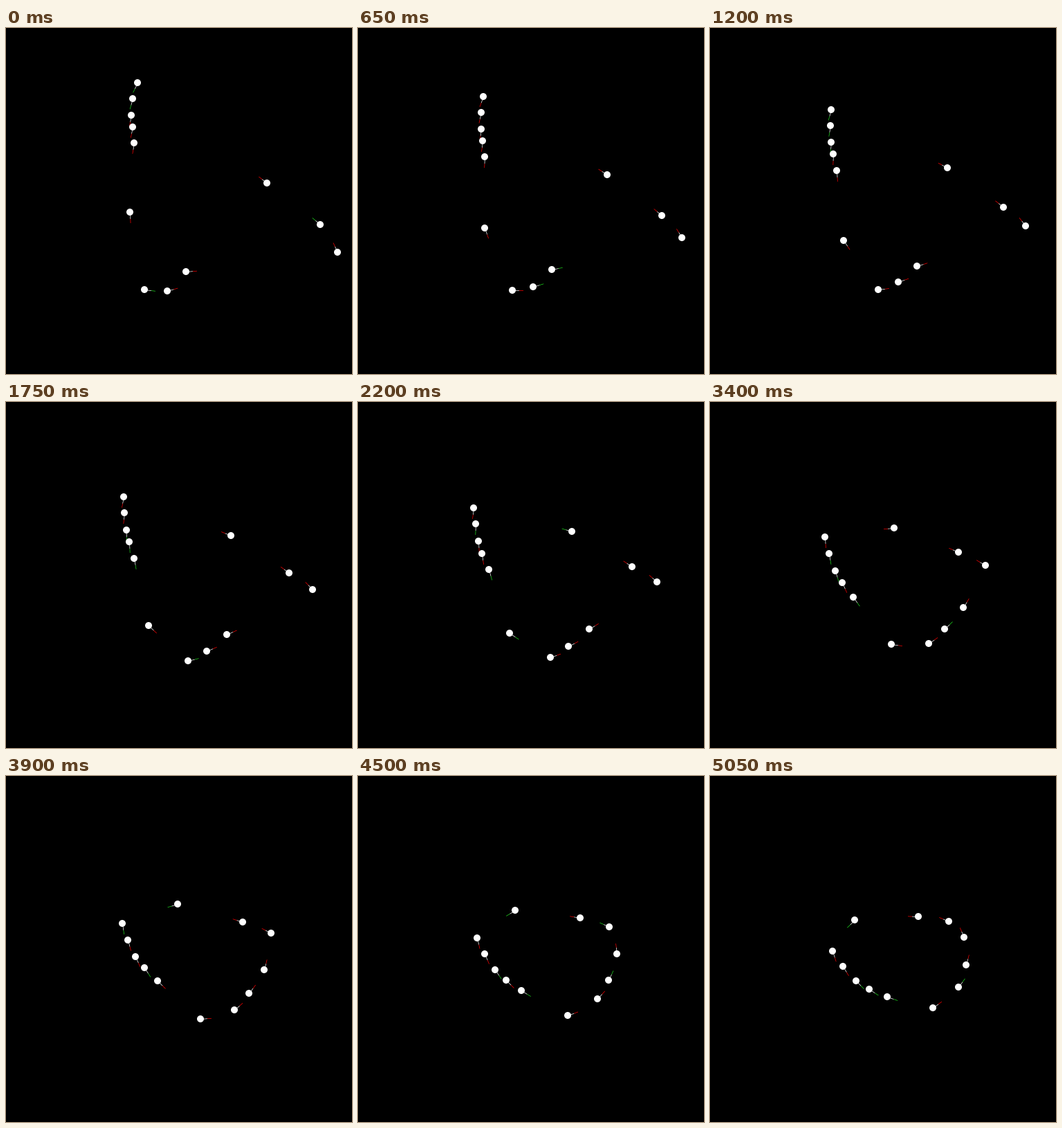
These frames come from a looping animation (500 by 500 pixels, 5100 ms). A matplotlib script:

```python
import random

import numpy as np
import matplotlib.pyplot as plt
from matplotlib.animation import FuncAnimation
from matplotlib.collections import LineCollection
from matplotlib.patches import Circle

SIZE, RADIUS, REACH, SPLIT = 500, 5, 15.5, 9.5
TICKS, TICK_MS = 102, 50
RED, GREEN = "#ff0000", "#1edc1e"

# Each agent glides on a cubic through four key points, a third of the way apart
KEY_STEPS = [0, 34, 67, 100]
PATHS = [
    [(190, 79), (170, 137), (166, 195), (177, 253)],
    [(183, 102), (171, 160), (172, 219), (192, 275)],
    [(181, 126), (174, 185), (181, 244), (211, 296)],
    [(183, 143), (178, 202), (191, 261), (230, 308)],
    [(185, 166), (185, 226), (207, 282), (256, 319)],
    [(179, 266), (206, 323), (262, 350), (322, 335)],
    [(200, 378), (263, 374), (316, 349), (359, 305)],
    [(233, 380), (290, 360), (339, 328), (370, 273)],
    [(260, 352), (319, 336), (366, 297), (367, 233)],
    [(479, 324), (443, 271), (398, 236), (345, 210)],
    [(454, 284), (409, 247), (359, 217), (301, 203)],
    [(377, 224), (325, 193), (266, 182), (209, 208)],
]
COUNT = len(PATHS)


def powers(step):
    return np.vander(np.atleast_1d(step) / 100, 4)


COEFS = np.linalg.solve(powers(np.array(KEY_STEPS)),
                        np.swapaxes(PATHS, 0, 1).reshape(4, -1))


def place(step):
    return (powers(step) @ COEFS).reshape(COUNT, 2)


fig = plt.figure(figsize=(SIZE / 100, SIZE / 100), dpi=100, facecolor="black")
ax = fig.add_axes([0, 0, 1, 1])
ax.set(xlim=(0, SIZE), ylim=(SIZE, 0))
ax.axis("off")

style = dict(linewidths=0.5, capstyle="butt")
stems = LineCollection([], colors="white", zorder=1, **style)
tips = LineCollection([], zorder=2, **style)
ax.add_collection(stems, autolim=False)
ax.add_collection(tips, autolim=False)
discs = [ax.add_patch(Circle((0, 0), RADIUS, fc="white", lw=0, zorder=3))
         for _ in range(COUNT)]


def draw(tick):
    step = max(0, tick - 1)
    pos = np.round(place(step))
    heading = place(step + 0.5) - place(step - 0.5)
    heading /= np.linalg.norm(heading, axis=1, keepdims=True)
    start = pos + 0.5
    split = start + SPLIT * heading
    stems.set_segments(np.stack([start, split], axis=1))
    tips.set_segments(np.stack([split, start + REACH * heading], axis=1))
    # Turn signals flicker independently at every step
    tips.set_color(random.Random(step).choices([RED, GREEN], (2, 1), k=COUNT))
    for disc, p in zip(discs, pos):
        disc.center = tuple(p)
    return [stems, tips, *discs]


anim = FuncAnimation(fig, draw, frames=TICKS, interval=TICK_MS,
                     repeat=True, repeat_delay=0)
plt.show()
```
